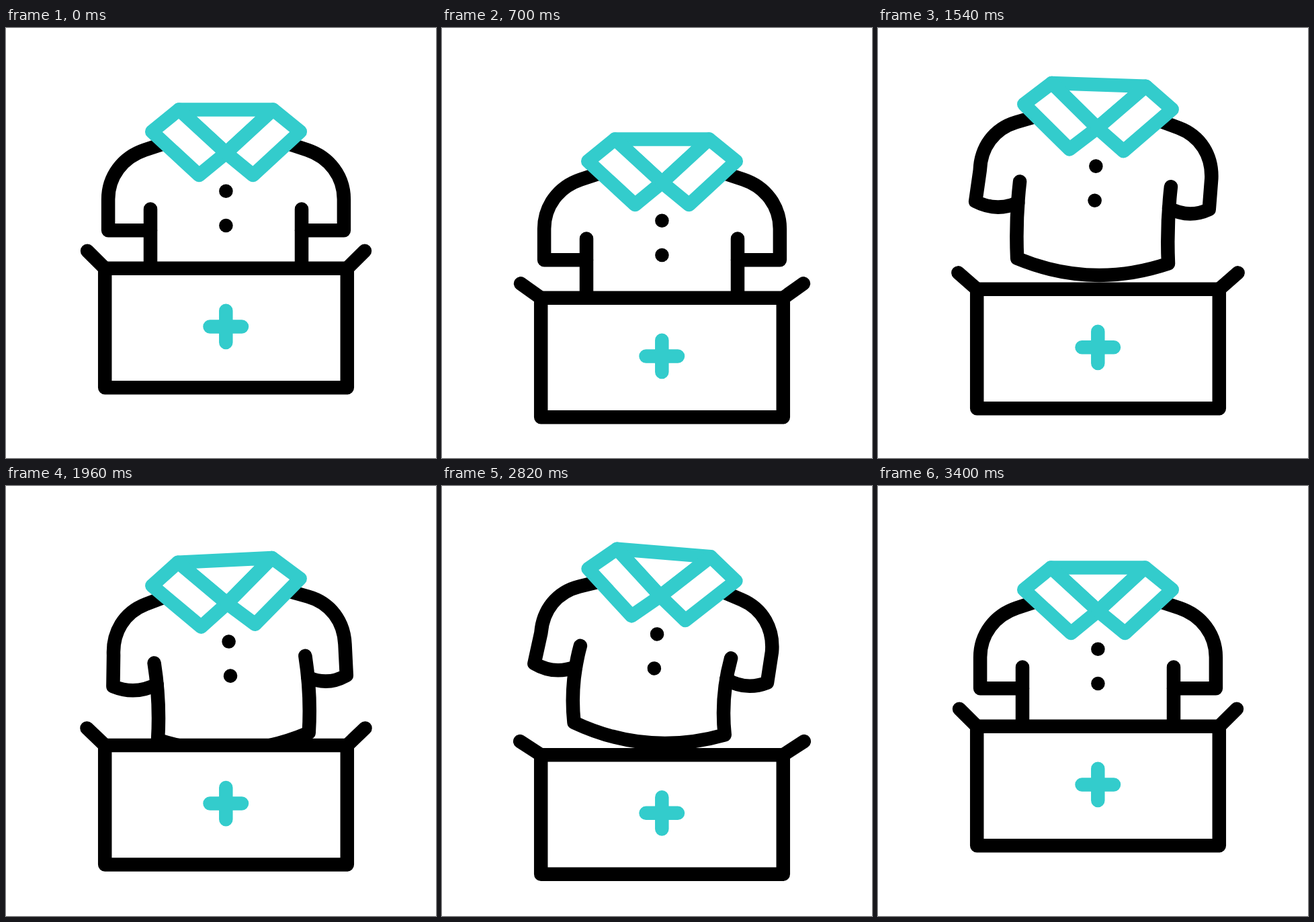
An HTML page that plays this animation: 640 by 640 pixels, repeating every 3620 ms.

```html
<!DOCTYPE html>
<html lang="en">
<head>
<meta charset="utf-8">
<title>Shirt in a box</title>
<style>
  html, body { margin: 0; width: 100%; height: 100%; overflow: hidden; background: #fff; }
  svg { display: block; width: 100%; height: 100%; }
  .line { fill: none; stroke: #000; stroke-width: 20.5; stroke-linecap: round; stroke-linejoin: round; }
  .teal { stroke: #33cccc; }
  .solid { fill: #fff; }
</style>
</head>
<body>
<svg viewBox="0 0 640 640">
  <g id="shirt">
    <path id="sleeves" class="line"/>
    <path id="torso" class="line"/>
    <circle cx="327.4" cy="242.8" r="10.3"/>
    <circle cx="327.4" cy="294" r="10.3"/>
    <path class="line teal solid" d="M257.5 121.5H397.5L327.5 186Z"/>
    <path class="line teal solid" d="M257.5 121.5L327.5 186L287.3 219L217.2 154.3Z"/>
    <path class="line teal solid" d="M397.5 121.5L327.5 186L367.7 219L437.8 154.3Z"/>
  </g>
  <g id="box">
    <path id="flaps" class="line"/>
    <path class="line solid" d="M147.2 357.8H507.8V535.2H147.2Z"/>
    <path class="line teal" d="M303.5 444.4H351M327.3 420.8V468"/>
  </g>
</svg>
<script>
const LOOP = 3620, STEP = 20, BEGIN = 220, END = 3400, MID = 327.5;
const $ = id => document.getElementById(id);
const shirt = $('shirt'), box = $('box'), flaps = $('flaps');
const torso = $('torso'), sleeves = $('sleeves');

// half-cosine ease from 0 to 1 between times a and b
function ease(t, a, b) {
  const p = Math.min(1, Math.max(0, (t - a) / (b - a)));
  return (1 - Math.cos(Math.PI * p)) / 2;
}

// glide from rest through [time, value] turning points and back to rest
function swing(t, from, ...turns) {
  let value = 0, time = from, last = 0;
  for (const [when, goal] of [...turns, [END, 0]]) {
    value += (goal - last) * ease(t, time, when);
    [time, last] = [when, goal];
  }
  return value;
}

const boxDrop = t => swing(t, BEGIN, [1000, 65], [1740, 24], [2600, 51.5]);
const shirtDrop = t => swing(t, BEGIN, [1000, 65], [1640, -43.5], [2260, 18], [2880, -23]);
const shirtTilt = t => swing(t, 950, [1300, 3], [2330, -5], [2880, 5]);
const softness = t => ease(t, 1000, 1480) - ease(t, 2880, END);

// the flaps open and shut twice
function flapAngle(t) {
  const p = Math.min(1, Math.max(0, (t - BEGIN) / (END - BEGIN)));
  return (45 - 14.5 * Math.sin(2 * Math.PI * p) ** 2) * Math.PI / 180;
}

// side: -1 left, 1 right
function sleeve(side, soft, lean, bow) {
  const x = d => MID + side * d;
  const arm = x(175.4 - 3 * soft);
  const cuff = x(175.4 - 1.5 * soft) + lean;
  const join = x(112.5) + bow * 0.8;
  return `M${x(93)} 172.3L${x(121)} 181.5C${x(154)} 192.5 ${arm} 221 ${arm} 255` +
    `L${cuff} 301.3Q${(cuff + join) / 2} ${301.3 + 15 * soft} ${join} 301.3`;
}

function draw(t) {
  const tilt = shirtTilt(t), soft = softness(t);
  const bow = -1.15 * tilt, lean = -2.6 * soft - 0.45 * tilt;

  shirt.setAttribute('transform', `translate(0 ${shirtDrop(t)}) rotate(${tilt} ${MID} 154)`);
  sleeves.setAttribute('d', sleeve(-1, soft, lean, bow) + sleeve(1, soft, lean, bow));
  torso.setAttribute('d', `M215 269.5Q${215 + 2 * bow} 327 215 384` +
    `Q${MID} ${384 + 42 * soft} 440 384Q${440 + 2 * bow} 327 440 269.5`);

  const a = flapAngle(t), dx = 37 * Math.cos(a), dy = 37 * Math.sin(a);
  box.setAttribute('transform', `translate(0 ${boxDrop(t)})`);
  flaps.setAttribute('d', `M147.2 357.8l${-dx} ${-dy}M507.8 357.8l${dx} ${-dy}`);
}

const start = performance.now();
function tick() {
  const t = (performance.now() - start) % LOOP;
  draw(Math.floor(t / STEP) * STEP);
  requestAnimationFrame(tick);
}
tick();
</script>
</body>
</html>
```
